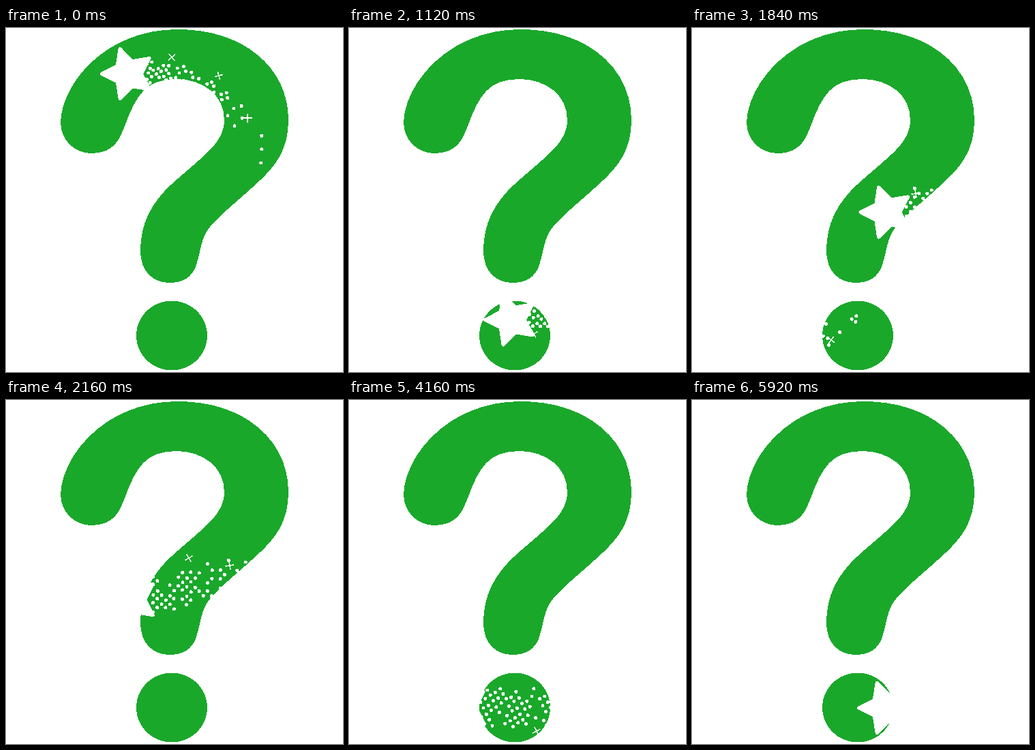
Animation of 494x505 px, one loop 6 s. Source, as an HTML page:

```html
<!DOCTYPE html>
<html lang="en">
<head>
<meta charset="utf-8">
<title>Question mark with shooting stars</title>
<style>
html, body { margin: 0; width: 100%; height: 100%; overflow: hidden; background: #fff; }
svg { display: block; shape-rendering: crispEdges; }
.mark { fill: #1aa82b; }
.light { fill: #fff; stroke: #fff; stroke-linejoin: round; }
.star { stroke-width: 5; }
.dust { stroke: none; }
.glint { stroke-width: 1.6; }
</style>
</head>
<body>
<svg id="stage" width="494" height="505" viewBox="0 0 494 505">
  <path class="mark" d="M80 138C82 82 145 2 252 2C348 2 414 58 414 135C414 180 394 203 372 224
    C350 245 328 262 308 282C285 304 288 318 279 348C273 366 259 374 240 374
    C214 374 197 356 197 327C197 286 214 256 242 230C258 215 276 201 293 185
    C312 167 320 152 320 135C320 98 288 75 250 75C205 75 191 98 174 144
    C167 161 160 184 125 184C101 184 80 165 80 138Z"/>
  <ellipse class="mark" cx="243" cy="451.5" rx="52" ry="51"/>
</svg>
<script>
const LOOP = 6000, STEP = 80, DUST_LIFE = 820, GLINT_LIFE = 700;
const GOLDEN = 0.618034;
const stage = document.getElementById('stage');

// Steep climb on the right of the top, gentle fall on the left.
const arc = (topX, topY) => x => topY + (x > topX ? 0.0055 : 0.002) * (x - topX) ** 2;
const line = (y, slope, x0) => x => y + slope * (x - x0);

// Each star is at x at time t and flies left at v px/ms, leaving a band of dust.
const stars = [
  { t: 0, x: 179, v: 0.325, y: arc(225, 63), band: 36,
    glints: [[354, 132], [312, 70], [243, 43], [93, 111]] },
  { t: 1040, x: 264, v: 0.325, y: arc(310, 418), band: 44, glints: [[271, 449], [204, 458]] },
  { t: 2160, x: 184, v: 0.317, y: line(293, -0.222, 184), band: 54,
    glints: [[328, 243], [268, 232]] },
  { t: 4160, x: 166, v: 0.6, y: line(451, 0, 0), band: 58, glints: [[275, 486]] },
  { t: 5920, x: 283, v: 0.6, y: line(452, 0, 0), band: 58, glints: [] }
];

let seed = 7;
const rand = () => (seed = seed * 16807 % 2147483647) / 2147483647;

function shape(tag, kind, attrs) {
  const el = document.createElementNS('http://www.w3.org/2000/svg', tag);
  el.setAttribute('class', 'light ' + kind);
  for (const name in attrs) el.setAttribute(name, attrs[name]);
  return stage.appendChild(el);
}

function starPoints() {
  const points = [];
  for (let i = 0; i < 10; i++) {
    const r = i % 2 ? 19.5 : 38.5, a = Math.PI * (1 + i / 5);
    points.push(r * Math.cos(a), r * Math.sin(a));
  }
  return points.join(' ');
}

const sparks = [];
const passTime = (s, x) => s.t + (s.x + 26 - x) / s.v;

function addDust(s) {
  for (let i = 0; i < 220; i++) {
    const x = 400 - i * 1.45;
    const tilt = Math.atan(s.y(x + 0.5) - s.y(x - 0.5));
    const off = ((i * GOLDEN) % 1 - 0.5) * s.band + (rand() - 0.5) * 3;
    const cx = x - off * Math.sin(tilt), cy = s.y(x) + off * Math.cos(tilt);
    const born = passTime(s, cx);
    sparks.push({ born, dies: born + DUST_LIFE * rand() ** 2,
      el: shape('circle', 'dust', { cx, cy, r: 2.5 }) });
  }
}

function addGlints(s) {
  for (const [x, y] of s.glints) {
    const born = passTime(s, x), turn = (x - 354) * 0.36;
    sparks.push({ born, dies: born + GLINT_LIFE,
      el: shape('path', 'glint', { d: 'M-6.5 0H6.5M0 -6.5V6.5',
        transform: `translate(${x} ${y}) rotate(${turn})` }) });
  }
}

const points = starPoints();
for (const s of stars) {
  addDust(s);
  addGlints(s);
  s.el = shape('polygon', 'star', { points });
}

function draw(t) {
  for (const p of sparks) {
    p.el.style.display = t >= p.born && t < p.dies ? '' : 'none';
  }
  for (const s of stars) {
    const x = s.x - s.v * (t - s.t);
    s.el.setAttribute('transform', `translate(${x} ${s.y(x)})`);
  }
}

const start = performance.now();
function tick() {
  const t = (performance.now() - start) % LOOP;
  draw(Math.floor(t / STEP) * STEP);
  requestAnimationFrame(tick);
}
tick();
</script>
</body>
</html>
```
